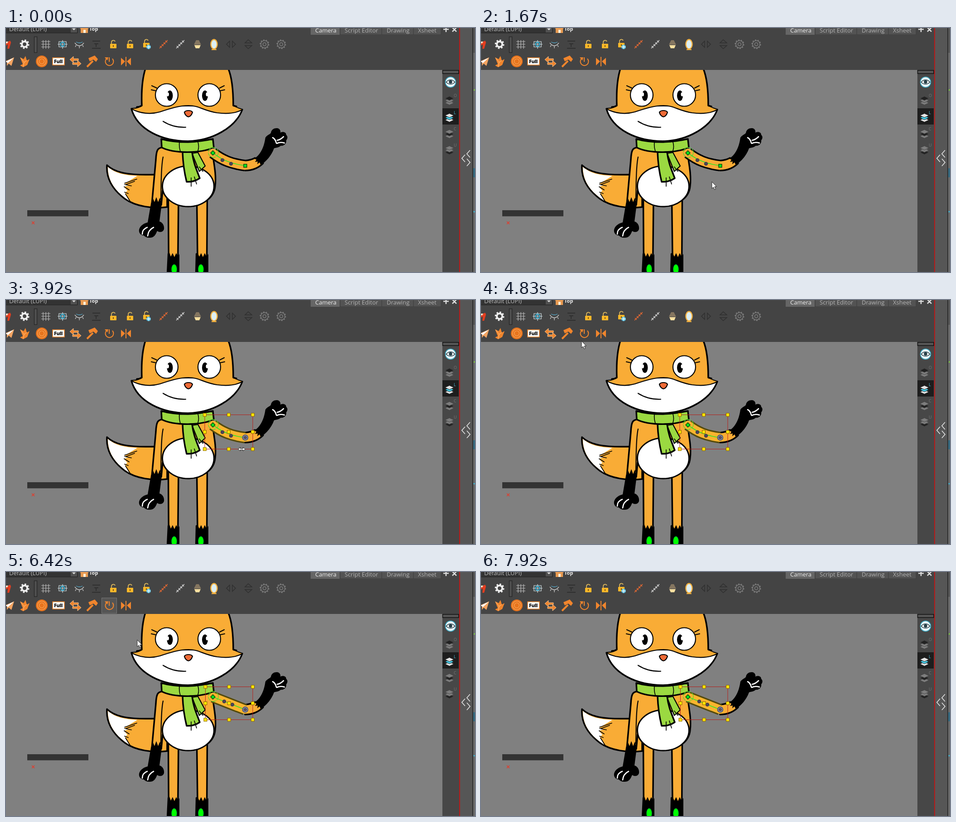
An HTML page that plays this animation: 1036x541 px, repeating every 8 s.

```html
<!DOCTYPE html>
<html lang="en">
<head>
<meta charset="utf-8">
<title>Rig reset</title>
<style>
html, body { margin: 0; width: 100%; height: 100%; overflow: hidden; background: #808080; }
svg { display: block; width: 1036px; height: 541px; }
text { font-family: "Open Sans", "Noto Sans", sans-serif; }
.o { fill: #f9ac36; } .w { fill: #fff; } .g { fill: #9bd941; } .n { fill: none; }
.k { stroke: #000; stroke-width: 3.5; stroke-linejoin: round; stroke-linecap: round; }
.t { stroke-width: 2.2; }
.hair { stroke-width: 1.7; }
.or { stroke: #f0852d; fill: none; } .of { fill: #f0852d; }
.dim { stroke: #2f2f2f; fill: none; }
</style>
</head>
<body>
<svg viewBox="0 0 1036 541">
<defs>
  <g id="gear" fill="none" stroke="currentColor">
    <circle r="9" stroke-width="3" pathLength="16" stroke-dasharray="1" />
    <circle r="6" stroke-width="4" />
  </g>
  <g id="dimgear" fill="none" stroke="#7c7c7c">
    <circle r="9.5" stroke-width="2" pathLength="20" stroke-dasharray="1" />
    <circle r="8" stroke-width="1.4" /><circle r="3.5" stroke-width="1.6" />
  </g>
  <g id="lock">
    <path d="M-4,0V-5a4.2,4.2 0 0 1 8,-1" fill="none" stroke="#d9b45c" stroke-width="1.8" />
    <rect x="-7" y="-1" width="14" height="10" rx="1" fill="#fbb829" />
    <rect x="-1" y="2" width="2" height="4" fill="#7a5310" />
  </g>
  <g id="bone" fill="none" stroke="currentColor" stroke-width="1.3">
    <path d="M-9,9L9,-9M-8,4l4,4M-4,0l4,4M0,-4l4,4M4,-8l4,4" />
  </g>
  <path id="sheet" d="M-10,0L0,-4.5L10,0L0,4.500Z" />
  <rect id="knob" x="-3.5" y="-3.5" width="7" height="7" fill="#ffe600" stroke="#8a6400" />
</defs>

<!-- character -->
<g id="fox">
  <path class="o k" d="M356,397C325,401 287,396 263,379C235,358 221,333 223,304C241,321 270,327 329,325L356,340Z" />
  <path class="w" d="M225,308C242,323 265,327 290,328L262,345L270,349L261,352L268,361L263,365L272,383C240,362 225,338 225,308Z" />
  <path class="n k hair" d="M289,335L262,344M284,340L265,347M277,350L262,347M272,359L261,352M270,367L262,364M274,384L264,368" />
  <path class="o k" d="M358.500,380L359.500,541H379.500L381,380ZM421.500,380L423.500,541H443.500L444.500,380Z" />
  <path d="M357,500L361,498L364,507L368,499L372,508L376,499L380,507L383,501V541H355ZM419,500L423,498L427,507L431,499L435,508L439,499L443,507L447,501V541H418Z" />
  <g fill="#0f0" stroke="#063"><ellipse cx="371.5" cy="535" rx="6" ry="11" /><ellipse cx="430.5" cy="535" rx="6" ry="11" /></g>
  <path class="o k" d="M346,265C335,265 332,271 331,292L322,392H343L346,360C355,385 380,394 402,394C440,393 460,374 462,350C465,325 459,300 455,270Z" />
  <path class="n k t" d="M347,286C342,308 343,345 342,380" />
  <ellipse class="w k" style="stroke-width:3" cx="402.5" cy="351" rx="57" ry="45" />
  <path d="M320,390L324,376L328,386L332,375L336,386L340,376L344,390L339,429C347,431 350,440 349,446C347,453 339,454 334,450C330,459 327,466 315,465C309,465 306,461 304,460C296,459 293,453 294,447C296,438 305,433 313,431Z" />
  <path class="n" stroke="#fff" stroke-width="2.6" stroke-linecap="round" d="M301,457Q301,446 312,442M313,461Q314,448 326,442" />
  <path class="w k" d="M277,179C290,226 345,251 402,251C455,250 507,221 522,181Q505,176 500,172L300,172Q293,179 277,179Z" />
  <path class="o" d="M308,90C300,115 299,145 301,172Q293,180 278,179C296,190 320,192 340,186C364,178 383,172 403,172C427,172 435,183 466,188C490,191 510,188 522,181Q505,177 501,170C502,140 500,112 491,90Z" />
  <path class="n k" d="M308,90C300,115 299,145 300,172Q295,175 289,175M491,90C500,112 502,140 502,172L509,174" />
  <path class="n k t" d="M277,179C296,190 320,192 340,186C364,178 383,172 403,172C427,172 435,183 466,188C490,191 510,188 522,181" />
  <g class="w k t"><circle cx="355" cy="148.500" r="25" /><circle cx="449" cy="148.500" r="25" /></g>
  <g><ellipse cx="362" cy="150" rx="6.500" ry="11.500" /><ellipse cx="439.500" cy="150" rx="6.500" ry="11.500" /></g>
  <g class="w"><ellipse cx="357" cy="147" rx="3" ry="4.500" /><ellipse cx="444.500" cy="147" rx="3" ry="4.500" /></g>
  <path class="n k t" d="M322,128L333,133M321,137L330,139M482,128L472,133M483,137L474,139M347,207Q369,221 397,220" />
  <path fill="#ee6a36" class="k t" d="M394,187Q396,183 403,183Q410,183 412,187Q409,196 403,197Q396,195 394,187Z" />
  <path class="g k t" d="M411,278L427,318L440,306L424,276Z" />
  <path class="g k" d="M390,275C391,304 395,325 399,341Q415,342 428,333C421,314 414,300 411,275Z" />
  <path class="g k" d="M343,246C360,251 380,253 402,253C425,252 443,249 457,246L459,265C430,278 372,279 344,265Z" />
  <path class="n k hair" d="M383,254Q382,264 385,273M424,253Q427,263 424,272M409,332V351M416,330L421,346M427,308L435,318" />
</g>

<!-- waving arm -->
<g fill="none" stroke-linecap="round">
  <path class="o k" d="M528,294Q541,293 550,288L568,300Q552,316 528,316Z" />
  <path fill="#000" d="M548,290C563,280 570,264 573,243C577,237 581,237 585,233C586,225 592,222 599,222C605,223 607,228 606,232C612,229 619,231 619,237C623,240 622,246 619,249C620,257 613,262 607,261C602,266 595,265 592,267C586,284 574,296 563,304L560,298L555,302L556,296L550,297L554,291Z" />
  <path stroke="#fff" stroke-width="2.600" d="M589,243Q595,246 597,255M599,249Q606,248 613,241M598,256Q606,252 615,255" />
  <path id="armEdge" stroke-width="25.500" stroke-linecap="butt" />
  <path id="armFill" stroke-width="19" />
  <circle id="ring" cx="458" cy="276" r="11" stroke="#55d92c" stroke-width="1.300" stroke-dasharray="9 3" />
  <path id="boneLine" stroke="#2ee62a" stroke-width="1.600" />
  <g fill="#4b4659" stroke="#383247"><circle id="dotA" r="3.700" /><circle id="dotB" r="3.700" /></g>
  <path d="M457,272l5,5l-5,5l-5,-5Z" fill="#0be420" stroke="#033d08" stroke-width="1.300" />
  <rect id="endFree" x="525" y="302" width="7" height="7" fill="#0be420" stroke="#033d08" stroke-width="1.300" />
  <g id="endHeld"><circle cx="528.500" cy="305" r="6" fill="#8c8da5" stroke="#424a76" stroke-width="1.600" /><circle cx="528.500" cy="305" r="3" fill="#5a526a" stroke="#444" /></g>
  <g id="frame"><rect id="frameRect" stroke="#b4201c" /><g id="knobs"></g></g>
</g>

<!-- toolbars -->
<path fill="#444" d="M0,0H1036V93H0Z" />
<path fill="#333" stroke="#222" d="M-1,-1H158V11H-1Z" />
<path fill="#505050" d="M143,0H157V10H143Z" /><path fill="#ddd" d="M146,1h8l-4,4Z" />
<text x="7" y="7" font-size="13" fill="#bbb">Default (LUPI)</text>
<path fill="#e89a51" d="M163,2L173,-6L183,2H181V11H165V2Z" /><path fill="#fff0d8" d="M171,4h5v7h-5Z" />
<text x="184" y="6" font-size="11" font-weight="700" fill="#eee">Top</text>
<path fill="#666" d="M673,0H737V15H673Z" />
<path fill="#535353" d="M738,0H961V14H738Z" />
<path stroke="#3d3d3d" d="M738,0V15M830,0V15M900,0V15M961,0V15" />
<g font-size="13" fill="#b4b4b4"><text x="683" y="10" fill="#eee">Camera</text><text x="748" y="10">Script Editor</text><text x="841" y="10">Drawing</text><text x="910" y="10">Xsheet</text></g>
<path stroke="#ddd" stroke-width="2.500" d="M966,3H978M972,-3V9M986,-1L995,8M995,-1L986,8" />

<g id="icons" fill="none" stroke-width="2">
  <path fill="#e43e20" d="M0,33L9,28L11,32L7,46L3,46L4,36L0,39Z" /><path fill="#f3d9c0" d="M0,30h5l-2,4h-3Z" />
  <use href="#gear" x="41" y="36" color="#eee" />
  <rect x="62.500" y="19.500" width="6" height="35" fill="#505050" stroke="#292929" stroke-width="1.500" />
  <path stroke="#bbb" stroke-width="1.200" d="M82,27V46M88,27V46M94,27V46M78,30H98M78,36H98M78,42H98" />
  <path stroke="#d5e5ea" stroke-width="1.200" d="M117,30H133V42H117ZM114,36H136M125,27V46" /><circle cx="125" cy="36" r="4.500" stroke="#32b5dd" />
  <path stroke="#ccc" stroke-width="1.300" d="M152,33Q162,46 172,33M155,38l-2,4M162,40v5M169,38l2,4" /><path stroke="#56abcd" stroke-width="1.300" d="M155,31Q162,35 169,31" />
  <path class="dim" d="M191,29H208M195,35H204M190,45H209M199,35V42" />
  <use href="#lock" x="237" y="36" /><use href="#lock" x="274" y="36" /><use href="#lock" x="310" y="34" />
  <circle cx="315" cy="42" r="5" fill="#58bede" /><path stroke="#fff" stroke-width="1.300" d="M311,42H319M315,38V46" />
  <use href="#bone" x="348" y="36" color="#f06b31" /><use href="#bone" x="385" y="36" color="#ddd" />
  <path fill="#857660" d="M420,27H426L431,37H415Z" /><path fill="#f7dfa0" d="M416,38H430L427,45H419Z" />
  <ellipse cx="459.500" cy="36" rx="7" ry="10.500" fill="#ddeff3" stroke="#f4b241" stroke-width="2.500" /><path stroke="#f4b241" d="M454,48H465" />
  <path class="dim" stroke-width="1.500" d="M494,29V43L487,36ZM500,29V43L507,36ZM528,33H543L535,26ZM528,39H543L535,46Z" />
  <use href="#dimgear" x="571" y="36" /><use href="#dimgear" x="608" y="36" />

  <path fill="#f2a361" d="M0,73L18,65L12,84L6,79L2,84V77L13,69L0,76Z" /><path fill="#fff" d="M0,74L17,66L4,78Z" />
  <path class="of" d="M31,65L39,69L43,62L46,72L52,69L47,82L38,87L31,83L37,80Z" /><path stroke="#ffc184" stroke-width="1" d="M32,66L40,76L46,72M38,86L40,76" />
  <circle cx="79" cy="74" r="13" fill="#e8741d" /><g stroke="#f9a95c" stroke-width="1.200"><circle cx="79" cy="74" r="9.500" /><circle cx="79" cy="74" r="5.500" /></g>
  <rect x="103" y="66" width="26" height="16" fill="#fff" stroke="#f0852d" stroke-width="1.500" />
  <path class="of" d="M141,70L149,63V68H160V72H149V77ZM166,79L158,72V77H147V81H158V86Z" stroke="#ffd2a4" stroke-width=".8" />
  <path class="of" d="M182,67L196,61L203,69L199,75L193,70L185,74Z" /><path class="or" stroke-width="4" d="M192,73L179,86" />
  <rect id="hover" x="211.500" y="57.500" width="33" height="34" fill="#555" stroke="#777" stroke-width="1" />
  <g class="or"><path d="M223,67A9,9 0 1 0 235,68" /><path d="M228,65V75" /></g><path class="of" d="M218,65l8,0l-2,7Z" />
  <path class="or" d="M265,64V85" /><path class="of" d="M254,66L263,74L254,83ZM276,66L267,74L276,83Z" />
</g>
<text x="106" y="78" font-size="11" font-weight="800" fill="#111" letter-spacing="-.4">Full</text>

<!-- side panel -->
<path fill="#474747" d="M964,93H1003V541H964Z" />
<path fill="#555" stroke="#111" stroke-width="1.500" d="M964.500,94H1000V101H964.500Z" />
<path fill="#1d1d1d" d="M964,178H1000V214H964Z" />
<circle cx="982" cy="120" r="11.500" fill="#e9f5f8" stroke="#37a9c4" stroke-width="1.500" />
<path fill="#fff" stroke="#263f48" stroke-width="1.600" d="M972,120Q982,110 992,120Q982,129 972,120Z" /><circle cx="982" cy="119.500" r="3.800" fill="#263f48" />
<g id="stacks" font-size="9"></g>
<path fill="#565656" d="M1003,0H1036V541H1003Z" />
<path stroke="#b91919" stroke-width="2" d="M1002,0V541" />
<path fill="none" stroke="#ddd" stroke-width="1.800" d="M1025,271L1018,279L1025,287M1014,281L1007,289L1014,297M1018,290L1025,298L1018,306" />
<path fill="#6a6a6a" d="M1031,55H1036V541H1031Z" /><path stroke="#222" stroke-width="1.500" d="M1031,0V541" />
<path fill="#7ac83a" d="M1032,138l4,-3v4Z" /><path fill="#35697f" d="M1032,311h4v20h-4Z" /><path fill="#3cb7d7" d="M1032,406h4l-2,4Z" />

<path fill="#333" d="M47,404H182V417.500H47Z" />
<path stroke="#e33a2b" stroke-width="1.500" d="M57,429L63,435M63,429L57,435" />

<g id="cursor" stroke="#222">
  <path id="arrow" fill="#fff" d="M0,0V15L3.500,12L6,17.500L8.500,16.500L6,11H10.500Z" />
  <path id="move" fill="#fff" d="M0,-7L3,-3H1V-1H3V-3L7,0L3,3V1H1V3H3L0,7L-3,3H-1V1H-3V3L-7,0L-3,-3V-1H-1V-3H-3Z" />
  <path id="resize" fill="#fff" d="M-8,0L-3,-4V-1.500H3V-4L8,0L3,4V1.500H-3V4Z" />
</g>
</svg>
<script>
const $ = id => document.getElementById(id);
const set = (id, attrs) => { for (const k in attrs) $(id).setAttribute(k, attrs[k]); };
const show = (id, on) => $(id).style.display = on ? '' : 'none';

const LOOP = 8000, SELECT = 2420, RESET = 5040, REFIT = 5500;
// pointer path: time, x, y
const track = [
  [0, 205, 560], [380, 205, 545], [920, 557, 325], [1040, 557, 325], [1330, 556, 350],
  [1540, 556, 350], [1670, 510, 341], [2000, 489, 297], [2400, 489, 297],
  [2650, 422, 330], [3000, 495, 312], [3170, 546, 345], [3230, 546, 345],
  [3480, 443, 331], [3750, 541, 331], [3920, 521, 331], [4670, 233, 117],
  [4830, 222, 91], [5050, 226, 73], [5460, 226, 73], [5900, 548, 333],
  [6260, 235, 85], [6330, 250, 105], [6420, 289, 150], [6800, 615, 346],
  [7080, 602, 322], [7150, 602, 322], [7700, 192, 65], [7900, 181, -25], [LOOP, 181, -25]
];

// layer buttons: letter, height, marked sheet counted from the top
$('stacks').innerHTML = [['O', 161, 0], ['L', 199, 1], ['C', 235, 1], ['U', 271, 2]].map(([name, y, mark]) => {
  const on = name === 'L';
  const sheet = i => `<use href="#sheet" x="979.5" y="${y - 5 + i * 5}" stroke="${on ? '#1d1d1d' : '#474747'}"
    fill="${i !== mark ? (on ? '#e4e4e4' : '#7d7d7d') : on ? '#45c9e4' : '#222'}"/>`;
  return [2, 1, 0].map(sheet).join('') + `<text x="989" y="${y - 8}" fill="${on ? '#4cbfda' : '#777'}">${name}</text>`;
}).join('');

function pointer(t) {
  const i = track.findIndex(p => p[0] > t);
  const [t0, x0, y0] = track[i - 1], [t1, x1, y1] = track[i];
  const u = (t - t0) / (t1 - t0);
  return [x0 + (x1 - x0) * u, y0 + (y1 - y0) * u];
}

function draw(t) {
  const held = t >= SELECT, straight = t >= RESET;
  const a = straight ? [482, 287] : [478, 293], b = straight ? [500, 294] : [497, 301];
  const path = `M457,277C${a} ${b} 528,305`;
  set('armEdge', { d: path, stroke: held ? '#554b0d' : '#000' });
  set('armFill', { d: path, stroke: held ? '#f9b52e' : '#f9ac36' });
  set('boneLine', { d: path });
  set('dotA', { cx: a[0], cy: a[1] });
  set('dotB', { cx: b[0], cy: b[1] });
  show('endFree', !held);
  show('endHeld', held);
  show('frame', held);

  const left = t < REFIT ? 439 : 440.5, bottom = t < REFIT ? 330.5 : 327.5, top = 254.5, right = 545;
  set('frameRect', { x: left, y: top, width: right - left, height: bottom - top });
  const xs = [left, (left + right) / 2, right], ys = [top, (top + bottom) / 2, bottom];
  $('knobs').innerHTML = xs.flatMap(x => ys.map(y => `<use href="#knob" x="${x}" y="${y}"/>`)).join('');

  const [x, y] = pointer(t);
  const near = held && x > left - 5 && x < right + 5 && y > top - 5 && y < bottom + 5;
  const inner = x > left + 5 && x < right - 5 && y > top + 5 && y < bottom - 5;
  show('arrow', !near);
  show('move', near && inner);
  show('resize', near && !inner);
  set('cursor', { transform: `translate(${x},${y})` });
  show('hover', t >= 4900 && t < 6480);
}

function tick(now) {
  draw(now % LOOP);
  requestAnimationFrame(tick);
}
draw(0);
requestAnimationFrame(tick);
</script>
</body>
</html>
```
